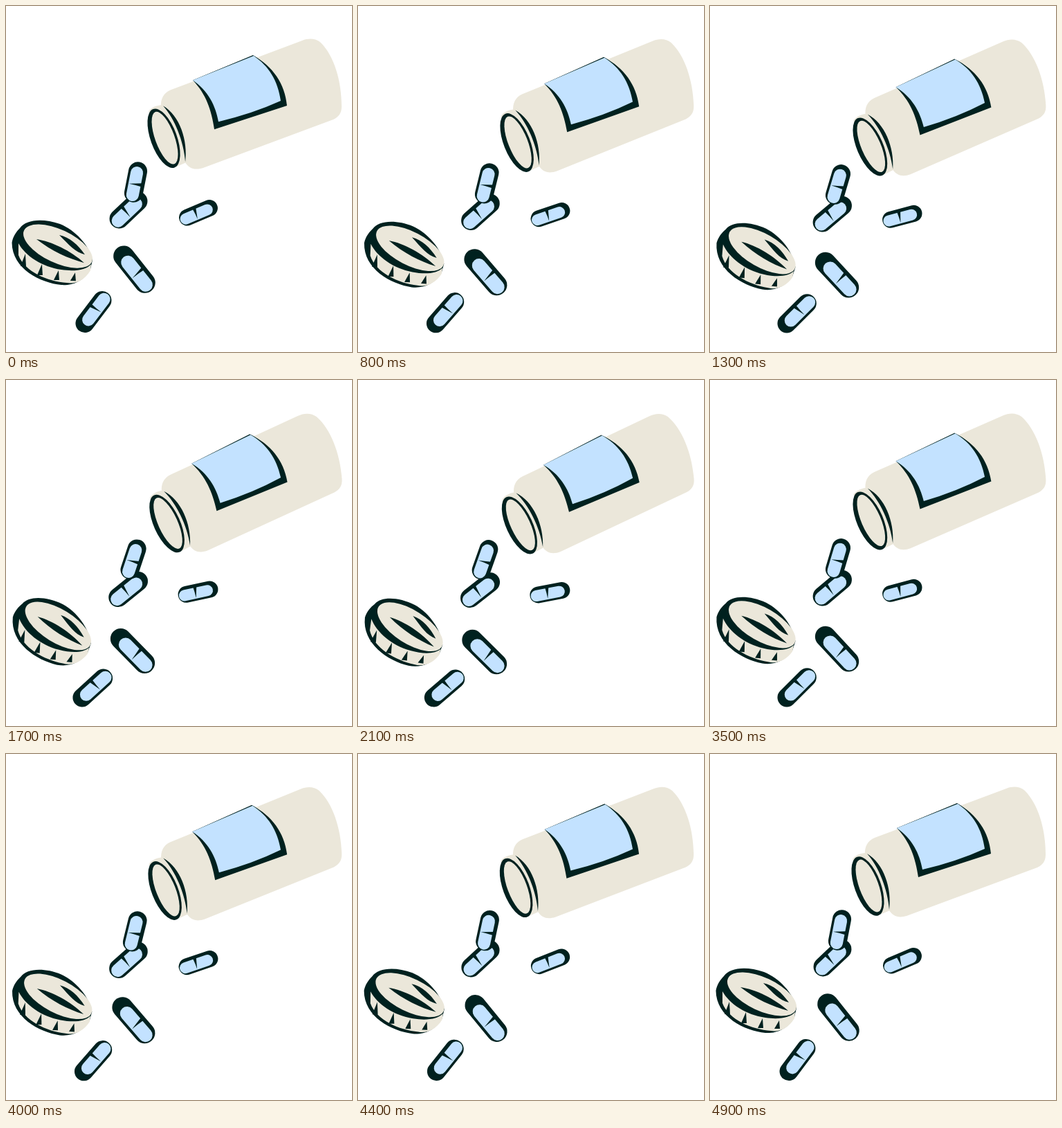
Recreate the animation shown at these times as an HTML page. Size 500x500 px, loop 5000 ms.

```html
<!DOCTYPE html>
<html lang="en">
<head>
<meta charset="utf-8">
<title>Spilled pills</title>
<style>
html, body { margin: 0; height: 100%; overflow: hidden; background: #fff; }
svg { display: block; width: 100%; height: 100%; }
.dark { fill: #00211f; }
.cream { fill: #ebe7da; }
.blue { fill: #c3e2ff; }
</style>
</head>
<body>
<svg id="art" viewBox="0 0 500 500"></svg>
<script>
const art = document.getElementById('art');
const parts = [];

const path = (fill, d) => `<path class="${fill}" d="${d}"/>`;
const oval = (fill, x, y, rx, ry, tilt) =>
  `<ellipse class="${fill}" rx="${rx}" ry="${ry}" transform="translate(${x} ${y}) rotate(${tilt})"/>`;
const bar = (fill, x1, x2, y, w) =>
  `<rect class="${fill}" x="${x1 - w / 2}" y="${y - w / 2}" width="${x2 - x1 + w}" height="${w}" rx="${w / 2}"/>`;

// Each part swings by deg about its pivot
function add(markup, deg, px, py) {
  const el = document.createElementNS('http://www.w3.org/2000/svg', 'g');
  el.innerHTML = markup;
  art.append(el);
  parts.push({ el, deg, px, py });
}

// A dark capsule with a pale one pushed to its far end; the notch enters from one side
function pill(x, y, angle, half, w, side, ...swing) {
  const face = w * 0.67, mid = half / 2 - 5, edge = side * face / 2;
  add(`<g transform="translate(${x} ${y}) rotate(${angle})">` +
    bar('dark', -half, half, 0, w) +
    bar('blue', -13.5, half + 3, -side, face) +
    path('dark', `M${mid - 3} ${edge}Q${mid - 1} 0 ${mid + 1} ${-edge}Q${mid + 1} 0 ${mid + 2} ${edge}Z`) +
    '</g>', ...swing);
}

add(
  path('cream', 'M224 146C223 134 228 125 238 121L428 50C438 46 448 47 455 53C474 72 485 108 485 145C485 155 481 160 473 164L284 234C274 237 264 236 258 224L235 175Z') +
  path('dark', 'M270 107C289 127 297 150 301 178L406 144C403 112 386 88 357 71Z') +
  path('blue', 'M270 107C292 122 303 144 307 167Q355 156 397 137C393 108 380 87 358 72Z') +
  path('cream', 'M206 152C210 146 220 142 230 143C250 155 262 190 260 226L246 232Z') +
  path('dark', 'M227 144C251 158 263 194 259 225C257 196 244 163 227 144Z') +
  oval('dark', 228, 191, 19, 45, -20) +
  oval('cream', 229.5, 190.5, 14, 40, -20),
  -5, 452, 138);

let stripes = '';
for (let i = 0; i < 4; i++)
  stripes += path('dark', `M${28 + 24 * i} ${358 + 18 * i - 3 * i * i}l-7 ${18 - 2 * i}h8Z`);
add(
  path('dark', 'M8.5 342C10 333 15 326 20 321C28 309 52 306 78 315C100 324 120 345 125 367L122 380C112 398 96 404 80 403C50 400 9 380 8.5 342Z') +
  path('cream', 'M18 343C28 361 52 377 80 381C100 384 116 381 123 373L122 382C113 397 100 402 88 400C60 398 27 384 18 360Z') +
  oval('cream', 75, 347, 54, 24, 25) +
  stripes +
  path('dark', 'M44 337C66 340 94 354 113 371C90 365 66 354 44 337ZM77 331C92 334 104 345 114 359C100 356 92 346 77 331Z'),
  7.7, 2, 354);

pill(177, 294.7, 136.6, 18.5, 28, 1, 5.2, 77, 294);
pill(187.5, 254.5, 101, 16, 27, -1, 8.6, 150, 230);
pill(278, 298.7, 157, 17.3, 24, 1, 12.5, 238, 300);
pill(185.5, 380.5, 51.5, 24.5, 30, -1, -6.9, 290, 410);
pill(126.5, 442, -53, 20.7, 27, -1, 12.6, 110, 437);

const start = performance.now();
function draw(now) {
  const t = Math.floor(Math.max(0, now - start) / 100) * 100;
  const x = (t + 100) % 5000 / 2500 * Math.PI;
  const swing = (1 - Math.cos(x)) / 2 + 0.05 * Math.abs(Math.sin(x));
  for (const { el, deg, px, py } of parts)
    el.setAttribute('transform', `rotate(${deg * swing} ${px} ${py})`);
  requestAnimationFrame(draw);
}
draw(start);
</script>
</body>
</html>
```
